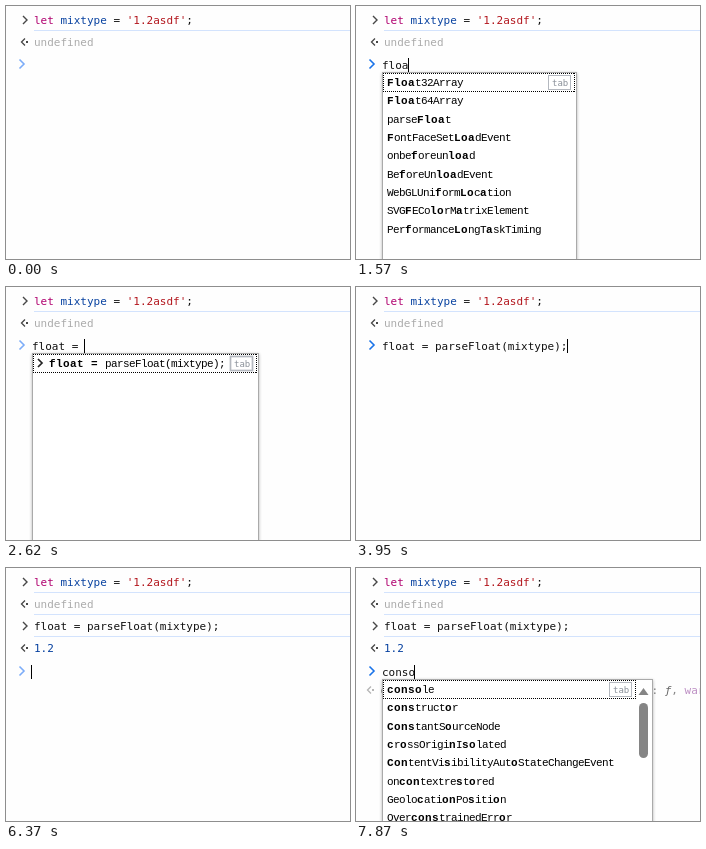
These frames come from a looping animation (344x253 px, 8000 ms). An HTML page with a canvas:

```html
<!DOCTYPE html>
<html lang="en">
<head>
<meta charset="utf-8">
<title>Console autocomplete</title>
<style>
html, body { margin: 0; width: 100%; height: 100%; overflow: hidden; background: #fefefe; }
canvas { display: block; width: 344px; height: 253px; }
</style>
</head>
<body>
<canvas id="stage" width="344" height="253"></canvas>
<script>
const ctx = document.getElementById('stage').getContext('2d');
const W = 344, H = 253, LOOP = 8000;
const MONO = '11px "DejaVu Sans Mono", monospace';
const LIST = '11px "Liberation Mono", monospace';
const BADGE = '9px "DejaVu Sans Mono", monospace';
const INK = '#111', BLUE = '#0842a0', DIM = '#ababab';
const ADV = 6.622, ROW = 18.33;

const words = s => s.split(' ');
const COMMAND = 'float = parseFloat(mixtype);';

// r: right end of the rows, bar: [top, length] of the scroll thumb
const menus = {
  f: { r: 216, bar: [24, 75], rows: words('fetch find focus frameElement frames false finally for for for'),
       hints: { 7: 'loop', 8: 'of loop' } },
  fl: { r: 234, bar: [24, 100], rows: words('Float32Array Float64Array parseFloat false File FileList FileReader finally frameElement FontFaceSetLoadEvent') },
  floa: { r: 219, rows: words('Float32Array Float64Array parseFloat FontFaceSetLoadEvent onbeforeunload BeforeUnloadEvent WebGLUniformLocation SVGFEColorMatrixElement PerformanceLongTaskTiming') },
  float: { r: 219, rows: words('Float32Array Float64Array parseFloat FontFaceSetLoadEvent BeforeUnloadEvent WebGLUniformLocation SVGFEColorMatrixElement PerformanceLongTaskTiming') },
  history: { r: 251, rows: [COMMAND], past: true },
  c: { r: 277, bar: [24, 17], rows: words('caches cancelAnimationFrame catch clearInterval clearTimeout clientInformation close closed') },
  co: { r: 277, bar: [24, 17], rows: words('confirm console const constructor continue copy Comment ConvolverNode') },
  con: { r: 277, bar: [24, 30], rows: words('confirm console const constructor continue ConvolverNode ConstantSourceNode crossOriginIsolated') },
  conso: { r: 280, bar: [24, 55], rows: words('console constructor ConstantSourceNode crossOriginIsolated ContentVisibilityAutoStateChangeEvent oncontextrestored GeolocationPosition OverconstrainedError') }
};

// [time, typed text, open menu, letters matched in the menu]
const typing = [
  [0, ''],
  [1250, 'f', 'f', 'f'],
  [1340, 'fl', 'f', 'f'],
  [1400, 'fl', 'fl', 'fl'],
  [1450, 'flo', 'fl', 'fl'],
  [1500, 'flo', 'floa', 'flo'],
  [1540, 'floa', 'floa', 'flo'],
  [1570, 'floa', 'floa', 'floa'],
  [1670, 'float', 'floa', 'floa'],
  [1760, 'float', 'float', 'float'],
  [2400, 'float '],
  [2480, 'float ='],
  [2550, 'float = '],
  [2620, 'float = ', 'history', 'float = '],
  [3950, COMMAND],
  [4910, ''],
  [6600, 'c'],
  [6680, 'c', 'c', 'c'],
  [6760, 'co', 'c', 'c'],
  [6830, 'co', 'co', 'co'],
  [7590, 'con', 'co', 'co'],
  [7660, 'con', 'con', 'con'],
  [7730, 'cons', 'con', 'con'],
  [7800, 'cons', 'conso', 'cons'],
  [7870, 'conso', 'conso', 'conso']
];
const caretFlips = [540, 740, 790, 3190, 3750, 4560, 4910, 5780, 6370, 7270, 7590];
const pointerPath = [[60, 86, 1], [100, 136, 24], [140, 129, 49], [310, 129, 51], [390, 128, 56], [470, 127, 62], [540, 127, 64]];

const lastAt = (list, t) => list.filter(e => e[0] <= t).pop();

function text(s, x, y, color = INK, font = MONO) {
  ctx.font = font;
  ctx.fillStyle = color;
  ctx.fillText(s, x, y);
}

// Runs of [string, color] on the console grid
function runs(x, y, parts) {
  for (const [s, color, font] of parts) {
    text(s, x, y, color, font);
    x += s.length * ADV;
  }
}

function line(points, color, width) {
  ctx.beginPath();
  points.forEach(([x, y]) => ctx.lineTo(x, y));
  ctx.strokeStyle = color;
  ctx.lineWidth = width;
  ctx.stroke();
}

const chevron = (x, y, d, color, width = 1.4) =>
  line([[x, y - d], [x + d, y], [x, y + d]], color, width);

function resultMark(x, y, color) {
  line([[x + 3.5, y - 3.5], [x, y], [x + 3.5, y + 3.5]], color, 1.3);
  ctx.fillStyle = color;
  ctx.fillRect(x + 4.5, y - 1, 2, 2);
}

function divider(y) {
  ctx.fillStyle = '#d3e3fd';
  ctx.fillRect(28, y, W, 1);
}

// Menu label with the matched letters in bold
function label(s, x, y, match) {
  let k = 0;
  for (const ch of s) {
    const hit = k < match.length && ch.toLowerCase() === match[k];
    if (hit) k++;
    text(ch, x, y, '#000', hit ? 'bold ' + LIST : LIST);
    x += hit ? 7 : 6;
  }
}

// Every second pixel along the edges
function dottedBox(x, y, w, h) {
  ctx.fillStyle = '#000';
  for (let i = 0; i < w; i += 2) {
    ctx.fillRect(x + i, y, 1, 1);
    ctx.fillRect(x + i, y + h - 1, 1, 1);
  }
  for (let i = 0; i < h; i += 2) {
    ctx.fillRect(x, y + i, 1, 1);
    ctx.fillRect(x + w - 1, y + i, 1, 1);
  }
}

function menu(m, match, top) {
  const right = m.r + (m.bar ? 16 : 1);
  ctx.save();
  ctx.shadowColor = 'rgba(0,0,0,.3)';
  ctx.shadowBlur = 3;
  ctx.shadowOffsetY = 1;
  ctx.fillStyle = '#fff';
  ctx.fillRect(26, top, right - 25, H);
  ctx.restore();
  ctx.strokeStyle = '#aaa';
  ctx.lineWidth = 1;
  ctx.strokeRect(26.5, top + .5, right - 26, H);
  dottedBox(27, top + 1, m.r - 27, 19);

  m.rows.forEach((s, i) => {
    const y = Math.round(top + 14 + i * ROW);
    if (m.past) chevron(32, y - 4, 4, '#222', 1.7);
    label(s, m.past ? 43 : 31, y, match);
    const hint = m.hints && m.hints[i];
    if (hint) [...hint].forEach((ch, k) =>
      text(ch, 213 - (hint.length - k) * 6, y, '#111', 'italic ' + LIST));
  });

  const bx = m.r - 26;
  ctx.strokeStyle = '#b4b8bf';
  ctx.strokeRect(bx - .5, top + 3.5, 22, 14);
  text('tab', bx + 3, top + 14, '#8a9099', BADGE);

  if (m.bar) {
    const x = m.r + 3;
    ctx.fillStyle = '#858585';
    ctx.beginPath();
    ctx.moveTo(x - .5, top + 16);
    ctx.lineTo(x + 4.5, top + 9);
    ctx.lineTo(x + 9.5, top + 16);
    ctx.fill();
    ctx.beginPath();
    ctx.roundRect(x, top + m.bar[0], 9, m.bar[1], 4.5);
    ctx.fill();
  }
}

function preview(y) {
  const parts = [['console {', '#999']];
  for (const key of ['debug', 'error', 'info', 'log', 'warn'])
    parts.push([key, '#bd8fc4'], [': ', '#888'], ['ƒ', '#666', 'italic ' + MONO], [', ', '#888']);
  runs(24, y, parts);
}

function pointer(x, y) {
  ctx.beginPath();
  [[0, 0], [0, 16], [4, 12.5], [6.5, 18], [9, 17], [6.5, 11.5], [11.5, 11.5]]
    .forEach(([px, py]) => ctx.lineTo(x + px + .5, y + py + .5));
  ctx.closePath();
  ctx.fillStyle = '#fff';
  ctx.fill();
  ctx.strokeStyle = '#000';
  ctx.lineWidth = 1;
  ctx.stroke();
}

function draw(t) {
  ctx.fillStyle = '#fefefe';
  ctx.fillRect(0, 0, W, H);

  const ran = t >= 4910, dy = ran ? 45 : 0;
  divider(24);
  chevron(17, 14, 4, '#474747');
  runs(28, 18, [['let', '#b0006f'], [' ', INK], ['mixtype', BLUE], [' = ', INK], ["'1.2asdf'", '#b3171e'], [';', INK]]);
  resultMark(15.5, 36, '#474747');
  text('undefined', 28, 40, DIM);
  if (ran) {
    divider(46);
    divider(68);
    chevron(17, 58, 4, '#474747');
    text(COMMAND, 28, 62);
    resultMark(15.5, 80, '#474747');
    text('1.2', 28, 84, BLUE);
  }

  const [, input, open, match] = lastAt(typing, t);
  const strong = (open && open !== 'history') || input === COMMAND;
  chevron(13.5, 58 + dy, 4.5, strong ? '#1a73e8' : '#7cacf8', 1.6);
  text(input, 26, 63 + dy);
  if (caretFlips.filter(c => c <= t).length % 2) {
    ctx.fillStyle = '#000';
    ctx.fillRect(Math.floor(25.6 + input.length * ADV), 52 + dy, 1, 14);
  }

  if (ran && open) {
    resultMark(11.5, 122, '#b5b5b5');
    if (open === 'conso') preview(126);
  }
  if (open) menu(menus[open], match, 66 + dy);

  const spot = lastAt(pointerPath, t);
  if (spot && t < 1250) pointer(spot[1], spot[2]);
}

const start = performance.now();
function tick() {
  draw((performance.now() - start) % LOOP);
  requestAnimationFrame(tick);
}
tick();
</script>
</body>
</html>
```
